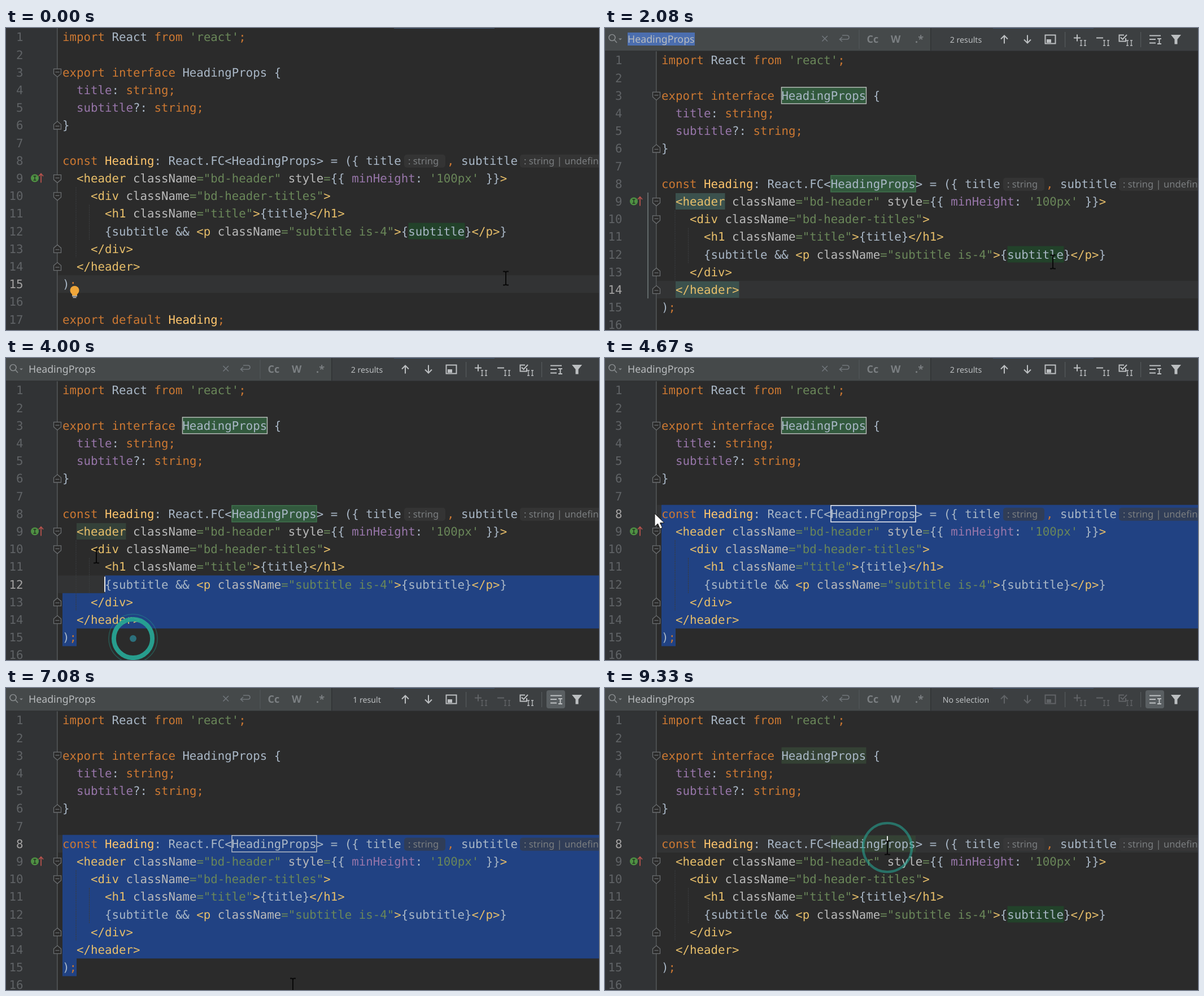
These frames come from a looping animation (1050x534 px, 9.41 s). An HTML page:

```html
<!DOCTYPE html>
<html lang="en">
<head>
<meta charset="utf-8">
<title>Find in selection</title>
<style>
  html, body { margin: 0; width: 100%; height: 100%; overflow: hidden; background: #2b2b2b; }
  svg { display: block; width: 1050px; height: 534px; }
  text { white-space: pre; text-rendering: geometricPrecision; }
  .code { font: 20.76px "DejaVu Sans Mono", monospace; }
  .ui { font-family: "Noto Sans", sans-serif; }
  .k { fill: #cc7832 } .d { fill: #a9b7c6 } .s { fill: #6a8759 }
  .t { fill: #e8bf6a } .a { fill: #bababa } .p { fill: #9876aa } .f { fill: #ffc66d }
  .icon { fill: none; stroke: currentColor; stroke-width: 2; }
  .dim { color: #606366 } .lit { color: #bcbfc1 }
</style>
</head>
<body>
<svg id="stage" viewBox="0 0 1050 534"></svg>
<script>
(() => {
const LOOP = 9410, ROW = 31.2, COL = 12.5, LEFT = 100;
const OPEN = 1583, CLICK_TAG = 1080, DRAG = 3670, SELECTED = 4330,
      CLICK_BUTTON = 5750, FILTERED = 5915, CLICK_WORD = 8910, CLEARED = 9245;

const lines = [
  ['k', 'import ', 'd', 'React ', 'k', 'from ', 's', "'react'", 'k', ';'],
  [],
  ['k', 'export interface ', 'd', 'HeadingProps {'],
  ['p', '  title', 'd', ': ', 'k', 'string;'],
  ['p', '  subtitle', 'd', '?: ', 'k', 'string;'],
  ['d', '}'],
  [],
  ['k', 'const ', 'f', 'Heading', 'd', ': React.FC<HeadingProps> = ({ title'],
  ['t', '  <header ', 'a', 'className', 's', '="bd-header"', 'a', ' style', 's', '=', 'd', '{{ ',
   'p', 'minHeight', 'd', ': ', 's', "'100px'", 'd', ' }}', 't', '>'],
  ['t', '    <div ', 'a', 'className', 's', '="bd-header-titles"', 't', '>'],
  ['t', '      <h1 ', 'a', 'className', 's', '="title"', 't', '>', 'd', '{title}', 't', '</h1>'],
  ['d', '      {subtitle && ', 't', '<p ', 'a', 'className', 's', '="subtitle is-4"', 't', '>',
   'd', '{subtitle}', 't', '</p>', 'd', '}'],
  ['t', '    </div>'],
  ['t', '  </header>'],
  ['d', ')', 'k', ';'],
  [],
  ['k', 'export default ', 'f', 'Heading', 'k', ';']
];

const rowTop = line => (line - 1) * ROW + .4;
const baseline = line => (line - 1) * ROW + 23.3;
const escapeText = s => s.replace(/&/g, '&amp;').replace(/</g, '&lt;');
const rect = (x, y, w, h, fill, more = '') =>
  `<rect x="${x}" y="${y}" width="${w}" height="${h}" fill="${fill}" ${more}/>`;
const mark = (id, line, col, len, fill) =>
  rect(LEFT + col * COL, rowTop(line) + 1, len * COL, 29, fill, `id="${id}"`);
const icon = (id, d, more = '') =>
  `<g id="${id}" class="lit"><path class="icon" d="${d}"/>${more}</g>`;

function codeLine(tokens, i) {
  let spans = '';
  for (let n = 0; n < tokens.length; n += 2)
    spans += `<tspan class="${tokens[n]}">${escapeText(tokens[n + 1])}</tspan>`;
  const y = baseline(i + 1);
  return `<text class="code" x="${LEFT}" y="${y}">${spans}</text>` +
    `<text class="code number" x="30.5" y="${y}" text-anchor="end">${i + 1}</text>`;
}

function fold(line, dir) {
  const y = (line - 1) * ROW + 16.5;
  return `<g transform="translate(91 ${y}) scale(1 ${dir})" fill="#2b2b2b" stroke="#6b6e70" stroke-width="1.3">
    <path d="M-6.5 -6.5H6.5V2L0 7.5L-6.5 2Z"/><path d="M-3.5 -1H3.5"/></g>`;
}

function editor() {
  const y8 = baseline(8);
  return rect(0, -50, 91, 620, '#313335') +
    rect(92, 0, 958, ROW, '#323334', 'id="band"') +
    mark('tagOpen', 9, 2, 7, '#3b514d') + mark('tagClose', 14, 2, 9, '#3b514d') +
    mark('word1', 3, 17, 12, '#32593d') + mark('word2', 8, 24, 12, '#32593d') +
    mark('usage', 12, 49, 8, '#22422a') +
    '<path id="selection" fill="#214283"/>' +
    `<path d="M124 ${rowTop(10)}V${rowTop(14)}M147.5 ${rowTop(11)}V${rowTop(13)}" stroke="#3a3c3e" stroke-dasharray="3 1"/>` +
    rect(90, -50, 1.5, 620, '#55585a') +
    rect(75, rowTop(9), 2, ROW * 6, '#626a6a', 'id="scope"') +
    rect(705, y8 - 18, 73, 23, '#3b3b3b', 'rx="5" opacity=".6"') +
    rect(910, y8 - 18, 160, 23, '#3b3b3b', 'rx="5" opacity=".6"') +
    `<g class="ui" font-size="16.6" fill="#7b7e80"><text x="712" y="${y8 - 1}">: string</text>
     <text x="917" y="${y8 - 1}">: string | undefined</text></g>
     <text class="code k" x="781" y="${y8}">,</text><text class="code d" x="806" y="${y8}">subtitle</text>` +
    lines.map(codeLine).join('') +
    [3, 9, 10].map(n => fold(n, 1)).join('') + [6, 13, 14].map(n => fold(n, -1)).join('') +
    `<g transform="translate(51 265.5)"><circle r="7" fill="#4f9143"/>
     <path d="M-2.5 -3.5H2.5M0 -3.5V3.5M-2.5 3.5H2.5" stroke="#243024" stroke-width="1.4"/>
     <path d="M11 8V-7M7 -3.5L11 -8L15 -3.5" fill="none" stroke="#b5524c" stroke-width="1.8"/></g>` +
    rect(0, 0, 2, 27, '#e6e6e6', 'id="caret"') +
    `<g id="bulb"><circle cx="121.5" cy="464" r="8" fill="#f0a63a"/>
     <path d="M117 470.5H126V473H117Z" fill="#f0a63a"/>
     <path d="M117 474H126M118.5 476.5H124.5" stroke="#c9ccce" stroke-width="1.5"/></g>`;
}

function findBar() {
  const pair = x => `<path d="M${x - 3} 22h4m-2 0v9m-2 0h4M${x + 4} 22h4m-2 0v9m-2 0h4"
    fill="none" stroke="currentColor" stroke-width="1.3"/>`;
  return rect(0, 0, 577, 40, '#45494a') + rect(577, 0, 473, 40, '#3c3f41') +
    rect(0, 40, 1050, 1.2, '#303234') + rect(449.5, 3, 1, 34, '#555a5c') + rect(576, 0, 1.5, 40, '#303335') +
    [814, 948].map(x => rect(x, 7, 1.2, 27, '#55595b')).join('') +
    rect(40, 8, 119, 23, '#4b6eaf', 'id="queryMark"') +
    `<text class="ui" x="40" y="26" font-size="17.8" fill="#b9bcbe">HeadingProps</text>
     <g fill="none" stroke="#85898b" stroke-width="1.7"><circle cx="12.5" cy="17" r="5.5"/>
     <path d="M16.5 21L21 26"/><path d="M24 18.5H30L27 21.5Z" fill="#85898b" stroke="none"/></g>
     <path d="M384.5 14L394 23.5M394 14L384.5 23.5M420 16L415.5 20L420 24M416 20H428Q432 20 432 16.5T428 13H420"
       fill="none" stroke="#70757a" stroke-width="1.6"/>
     <g class="ui" font-weight="700" font-size="18" fill="#7b7f82"><text x="463.5" y="25.5">Cc</text>
     <text x="506" y="25.5">W</text><text x="549" y="25.5">.*</text></g>
     <text id="results" class="ui" x="639" y="25.5" font-size="14.2" fill="#bcbfc1" text-anchor="middle"></text>` +
    icon('up', 'M707 27.5V14M701 19.5L707 13.5L713 19.5') +
    icon('down', 'M748 12.5V26M742 20.5L748 26.5L754 20.5') +
    icon('pane', 'M779.5 12.5H797.5V27.5H779.5Z', rect(782, 20, 8, 6, 'currentColor')) +
    icon('plus', 'M830 17.5H842M836 11.5V23.5', pair(844)) +
    icon('minus', 'M870 17.5H882', pair(885)) +
    icon('check', 'M922 18V23.5H910.5V12.5H919M913 16.5L916.5 20L924 12', pair(926)) +
    rect(957, 4, 33, 32, '#5a5f62', 'id="toggle" rx="4"') +
    icon('list', 'M964 13.5H984M964 20H975M964 26.5H975M978 19H985M981.5 19V28M978 28H985') +
    '<path d="M1002 12H1020L1013.5 20V28.5H1008.5V20Z" fill="#bcbfc1"/>';
}

document.getElementById('stage').innerHTML =
  rect(0, 0, 1050, 534, '#2b2b2b') + `<g id="editor">${editor()}</g><g id="find">${findBar()}</g>` +
  rect(687, 0, 178, 1, '#3f546c') +
  `<g id="ring"><circle id="halo" fill="none" stroke="#26a294" stroke-width="1.5" opacity=".4"/>
   <circle id="circle" fill="none" stroke="#27a493"/><circle id="dot" fill="#2d8d9d" opacity=".75"/></g>
   <g id="pointer"><path id="beam" d="M-5 -11.5H-1.5L0 -10L1.5 -11.5H5M0 -10V11M-5 12.5H-1.5L0 11L1.5 12.5H5"
     fill="none" stroke="#080808" stroke-width="2"/>
   <path id="arrow" d="M0 0V23L5.5 18L9.5 27L13.5 25L9.5 16.5H17Z" fill="#fff" stroke="#1a1a1a"/></g>`;

const el = id => document.getElementById(id);
const show = (id, on) => el(id).setAttribute('visibility', on ? 'visible' : 'hidden');
const set = (id, attrs) => { for (const k in attrs) el(id).setAttribute(k, attrs[k]); };
const numbers = [...document.querySelectorAll('.number')];
const linear = u => u, smooth = u => u * u * (3 - 2 * u);

// Interpolates rows of [time, ...values].
function track(rows, t, ease = linear) {
  const i = rows.findIndex(r => r[0] > t);
  if (i === 0) return rows[0].slice(1);
  if (i < 0) return rows[rows.length - 1].slice(1);
  const a = rows[i - 1], b = rows[i], u = ease((t - a[0]) / (b[0] - a[0]));
  return a.slice(1).map((v, n) => v + (b[n + 1] - v) * u);
}

const mousePath = [
  [200, 885, 442], [950, 793, 413], [2670, 793, 413], [3560, 225, 496], [DRAG, 225, 496],
  [4000, 160, 350], [4400, 88, 275], [4750, 88, 275], [5500, 969, 18], [6420, 969, 18],
  [7080, 508, 525], [7420, 491, 491], [8200, 491, 491], [8850, 500, 282]
];
const clicks = [[CLICK_TAG, 793, 413], [DRAG, 225, 496], [CLICK_BUTTON, 969, 19], [CLICK_WORD, 500, 282]];
// age, radius, stroke, opacity, dot radius
const ringShape = [[0, 12, 2, 0, 12], [20, 14, 2, .1, 11], [80, 19, 3, .95, 9],
  [330, 34, 8, .95, 6], [430, 44, 4, .55, 0], [520, 48, 2, 0, 0]];
// time, caret line; latest first
const caretLine = [[SELECTED, 8], [4250, 9], [4165, 10], [3995, 12], [3915, 13], [3830, 14],
  [DRAG, 15], [CLICK_TAG, 14], [0, 15]];

function draw(t) {
  const open = t >= OPEN, scroll = open ? 41 : 0;
  const line = caretLine.find(r => t >= r[0])[1];
  const cleared = t >= CLEARED, selecting = t >= DRAG && line < 15 && !cleared;
  const whole = t >= SELECTED && !cleared, filtered = t >= FILTERED;
  const selX = LEFT + Math.round((line - 8) * 1.5) * COL;

  set('editor', { transform: `translate(0 ${scroll})` });
  set('band', { y: rowTop(line) });
  numbers.forEach((n, i) => n.setAttribute('fill', i + 1 === line ? '#a4a3a3' : '#606366'));
  show('bulb', t < CLICK_TAG);

  const tagged = t >= CLICK_TAG && t < DRAG;
  show('tagOpen', tagged || (t >= DRAG && t < 4250));
  set('tagOpen', { fill: tagged ? '#3b514d' : '#344139' });
  show('tagClose', tagged);
  show('scope', tagged);

  const wordFill = cleared ? '#344134' : '#32593d';
  show('word1', open && (!filtered || cleared));
  show('word2', open);
  set('word1', { fill: wordFill, stroke: cleared ? 'none' : '#b4bab6', 'stroke-width': 1.5 });
  set('word2', {
    fill: whole ? 'none' : wordFill, 'stroke-width': 1.6,
    stroke: cleared ? 'none' : !whole ? '#3f704c' : filtered ? '#a9b2c0' : '#e4e7ec'
  });
  el('selection')[whole ? 'after' : 'before'](el('word2'));

  show('selection', selecting);
  set('selection', { d: `M${selX} ${rowTop(line)}H1050V${rowTop(15)}H125V${rowTop(16)}H100V${rowTop(line + 1)}H${selX}Z` });

  const dragging = t >= DRAG && t < SELECTED, placed = t >= CLICK_WORD;
  const caretX = placed ? 500 : dragging ? (line < 15 ? selX : 125) : 237;
  show('caret', placed || dragging || (t >= CLICK_TAG && !open));
  set('caret', { x: caretX - 1, y: rowTop(line) + 2 });

  show('find', open);
  show('queryMark', open && t < DRAG);
  el('results').textContent = cleared ? 'No selection' : filtered ? '1 result' : '2 results';
  const dim = (ids, on) => ids.forEach(id => set(id, { class: on ? 'dim' : 'lit' }));
  dim(['up', 'down', 'pane', 'check'], cleared);
  dim(['plus', 'minus'], filtered);
  show('toggle', t >= 5450);
  set('toggle', { fill: filtered ? '#5a5f62' : '#4c5052' });

  const [x, y] = track(mousePath, t, smooth);
  const row = (y - scroll) / ROW + 1;
  const overSelection = whole && x >= LEFT && row >= 8 && (row < 15 || (row < 16 && x < 125));
  const arrow = t >= 4400 && !cleared && (y < 41 || x < 91 || overSelection);
  set('pointer', { transform: `translate(${x} ${y})` });
  show('arrow', arrow);
  show('beam', !arrow);

  const click = clicks.find(c => t >= c[0] && t < c[0] + 520);
  el('ring').style.display = click ? '' : 'none';
  if (click) {
    const age = t - click[0], [r, width, opacity, dot] = track(ringShape, age);
    set('ring', { transform: `translate(${click[1]} ${click[2]})`, opacity });
    set('circle', { r, 'stroke-width': width });
    set('halo', { r: r + 9 });
    show('halo', age > 200 && age < 400);
    set('dot', { r: dot });
  }
}

const start = performance.now();
function tick() {
  draw((performance.now() - start) % LOOP);
  requestAnimationFrame(tick);
}
draw(0);
requestAnimationFrame(tick);
})();
</script>
</body>
</html>
```
